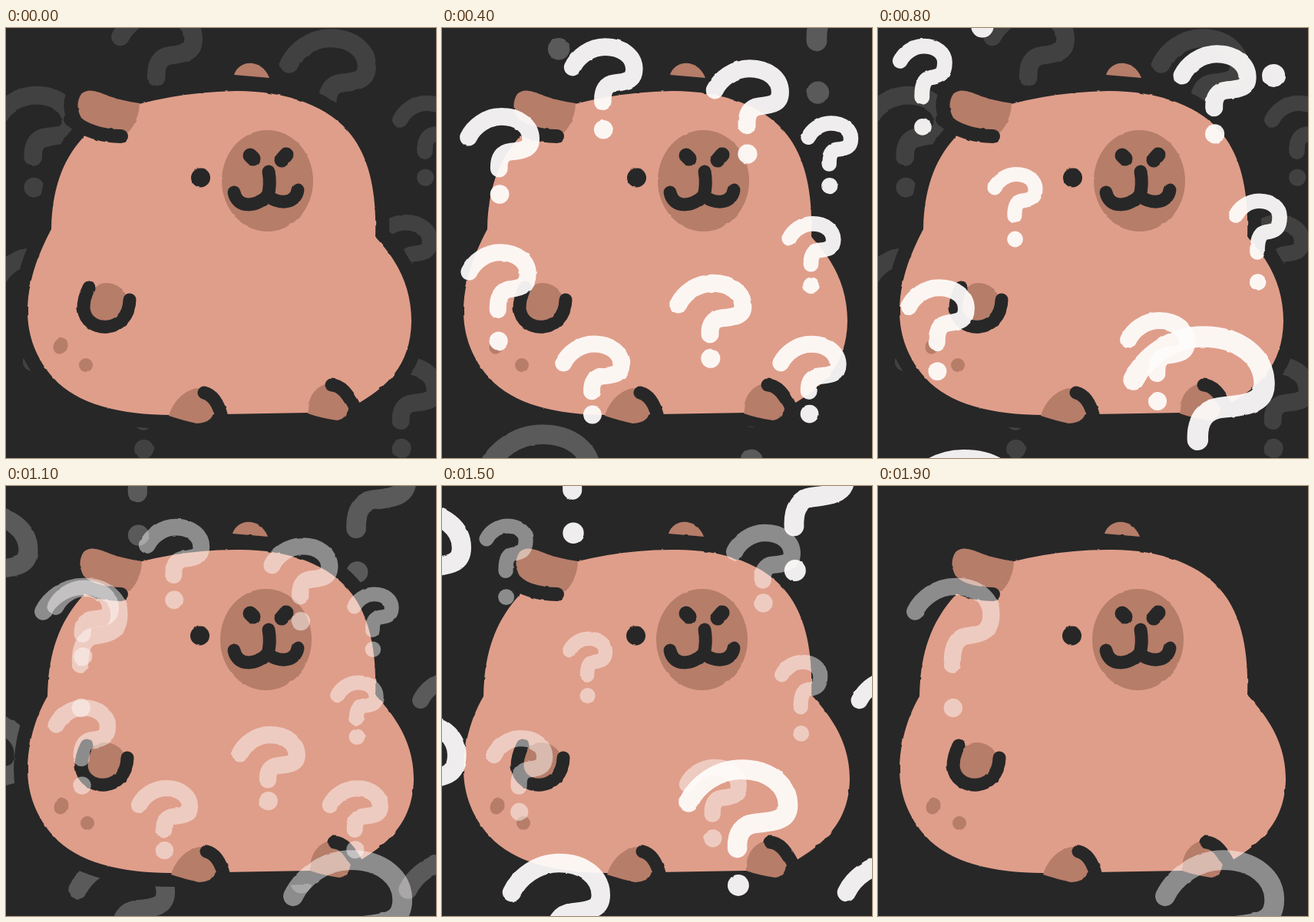
Animation of 560 by 560 pixels, one loop 2 s. Source, as an HTML page:

```html
<!DOCTYPE html>
<html lang="en">
<head>
<meta charset="utf-8">
<title>Puzzled capybara</title>
<style>
  html, body { margin: 0; width: 100%; height: 100%; overflow: hidden; background: #272727; }
  svg { display: block; width: 100vw; height: 100vh; }
  .ink { fill: none; stroke: #272727; }
  .halo { fill: #272727; stroke: #272727; stroke-width: 36; }
  .skin { fill: #df9e8a; }
  .brown { fill: #b67d69; }
  .marks { fill: none; stroke: #fffdfc; }
</style>
</head>
<body>
<svg viewBox="0 0 560 560" stroke-linecap="round" stroke-linejoin="round">
  <defs>
    <filter id="rough" filterUnits="userSpaceOnUse" x="-20" y="-20" width="600" height="600" color-interpolation-filters="sRGB">
      <feTurbulence type="fractalNoise" baseFrequency=".08" seed="4"/>
      <feDisplacementMap in="SourceGraphic" scale="2.5" xChannelSelector="R" yChannelSelector="G"/>
    </filter>
  </defs>
  <g id="behind" class="marks" filter="url(#rough)"></g>
  <g id="animal" filter="url(#rough)"></g>
  <g id="second" class="marks" filter="url(#rough)"></g>
  <g id="first" class="marks" filter="url(#rough)"></g>
</svg>
<script>
const byId = id => document.getElementById(id);

// A mark hangs from its tail (x, y); the dot sits `drop` below the tail
const mark = (x, y, width, drop) => ({ x, y, width, drop });
const outerRing = {
  cx: 283, cy: 264,
  marks: [
    mark(169, 49, 81, 82), mark(356, 79, 86, 84), mark(479, 141, 56, 64),
    mark(32, 141, 82, 75), mark(33, 318, 77, 91), mark(308, 361, 85, 71),
    mark(454, 274, 58, 62), mark(157, 438, 76, 68), mark(443, 438, 75, 67)
  ]
};
const innerRing = {
  cx: 271, cy: 259,
  marks: [
    mark(29, 43, 58, 86), mark(396, 62, 85, 76), mark(152, 208, 53, 67),
    mark(466, 244, 57, 87), mark(40, 363, 75, 84), mark(326, 406, 76, 80)
  ]
};

// A run drifts outwards at a steady pace, then the kick throws it off the stage
const tracks = [
  { id: "behind", ring: outerRing, begin: 0, steps: 7, alpha: .24, size: 1.175, drift: .09, kick: .00024 },
  { id: "first", ring: outerRing, begin: 3, steps: 7, alpha: .93, size: .87, drift: .12, kick: .00017 },
  { id: "second", ring: innerRing, begin: 7, steps: 5, alpha: .93, size: .88, drift: .12, kick: .0005 }
];
const stepTime = 100, loopSteps = 20, runGap = 8;

function drawMark({ x, y, width, drop }, { cx, cy }, scale) {
  const line = 22.5 * (width / 80) ** .4 * scale ** .25;
  const rise = .33 * width, stem = .55 * drop;
  const at = (px, py) =>
    `${(cx + (x + px * width - cx) * scale).toFixed(1)} ${(cy + (y + py - cy) * scale).toFixed(1)} `;
  const hook = "M" + at(0, 0) +
    "C" + at(.08, -.5 * rise) + at(.28, -rise) + at(.53, -rise) +
    "C" + at(.82, -rise) + at(1, -.5 * rise) + at(1, .03 * width) +
    "C" + at(1, .36 * stem) + at(.9, .42 * stem) + at(.68, .46 * stem) +
    "Q" + at(.48, .5 * stem) + at(.49, stem);
  return `<path d="${hook}" stroke-width="${line}"/>` +
    `<path d="M${at(.5, drop)}h.01" stroke-width="${line * 1.09}"/>`;
}

function drawTrack({ id, ring, begin, steps, alpha, size, drift, kick }, step) {
  const group = byId(id);
  const age = (step - begin) % runGap;
  const visible = age >= 0 && age < steps && step < begin + 2 * runGap;
  const edge = age === 0 || age === steps - 1;
  const scale = size + drift * age + kick * age ** 5;
  group.setAttribute("opacity", edge ? alpha * .51 : alpha);
  group.innerHTML = visible ? ring.marks.map(m => drawMark(m, ring, scale)).join("") : "";
}

// Pose 0 or 1: the second pose is a little wider, with the details nudged
function drawAnimal(pose) {
  const shift = (dx, dy, content) =>
    `<g transform="translate(${dx * pose} ${dy * pose})">${content}</g>`;
  const shape = (kind, d) => `<path class="${kind}" d="${d}"/>`;
  const oval = (x, y, rx, ry, turn = 0) =>
    `<ellipse class="brown" cx="${x}" cy="${y}" rx="${rx}" ry="${ry}" transform="rotate(${turn} ${x} ${y})"/>`;
  const ink = (d, width = 17) => `<path class="ink" d="${d}" stroke-width="${width}"/>`;

  const right = 528 + 3 * pose, neck = 59 - 5 * pose, neckY = 262 + 12 * pose;
  const body = `M300 ${82 + pose}C366 82 422 102 450 140C473 170 483 214 481 272
    C508 301 ${right} 335 ${right} 382C${right - 1} 434 502 463 462 487
    Q440 501 395 501L215 504C150 504 92 490 62 456C40 432 28 402 28 368
    C29 330 40 298 ${neck} ${neckY}C${neck + 1} 215 71 175 100 143C120 116 150 103 173 99Q235 83 300 ${82 + pose}Z`;
  const ear = "M98 86Q106 78 122 84Q145 94 174 98Q173 122 158 137Q118 136 98 117Q89 100 98 86Z";

  byId("animal").innerHTML =
    shape("halo", body) + shift(3, 0, shape("halo", ear)) +
    shift(-2, 1, shape("brown", "M297 61C303 41 333 39 343 65Z")) +
    shape("skin", body) + shift(3, 0, shape("brown", ear)) +
    ink("M84 119Q112 141 150 141", 18) +
    shift(-2, 1, oval(340.5, 199, 59.5, 66)) +
    shift(-1, 0, ink("M253.5 195h.01", 25)) +
    ink("M318 166L322 170M365 165L359 172", 19) +
    ink("M342 187Q345 203 341 219M297 214C301 236 327 233 341 218C352 229 377 231 380 211") +
    shift(-3, 0, shift(1, 2, oval(131, 357, 27, 25)) +
      ink("M108 338Q101 352 101 365C104 399 160 399 161 354")) +
    shift(1, 3, oval(71, 414, 9, 11, 30)) +
    shift(2, 0, oval(104, 439, 9, 9)) +
    shift(3, 1, shape("brown", "M212 505C219 481 239 468 254 469Q271 484 270 500Q269 514 248 515Q230 511 212 505Z") +
      ink("M258 475C270 478 277 490 281 507")) +
    shift(3, -1, shape("brown", "M393 502C392 479 406 463 423 463Q440 475 445 495Q444 509 431 511Q410 508 393 502Z") +
      ink("M424 465C437 465 446 478 454 494"));
}

let shown = -1;
const start = performance.now();
function tick() {
  const step = Math.floor((performance.now() - start) / stepTime) % loopSteps;
  if (step !== shown) {
    shown = step;
    drawAnimal(step < loopSteps / 2 ? 0 : 1);
    tracks.forEach(track => drawTrack(track, step));
  }
  requestAnimationFrame(tick);
}
tick();
</script>
</body>
</html>
```
